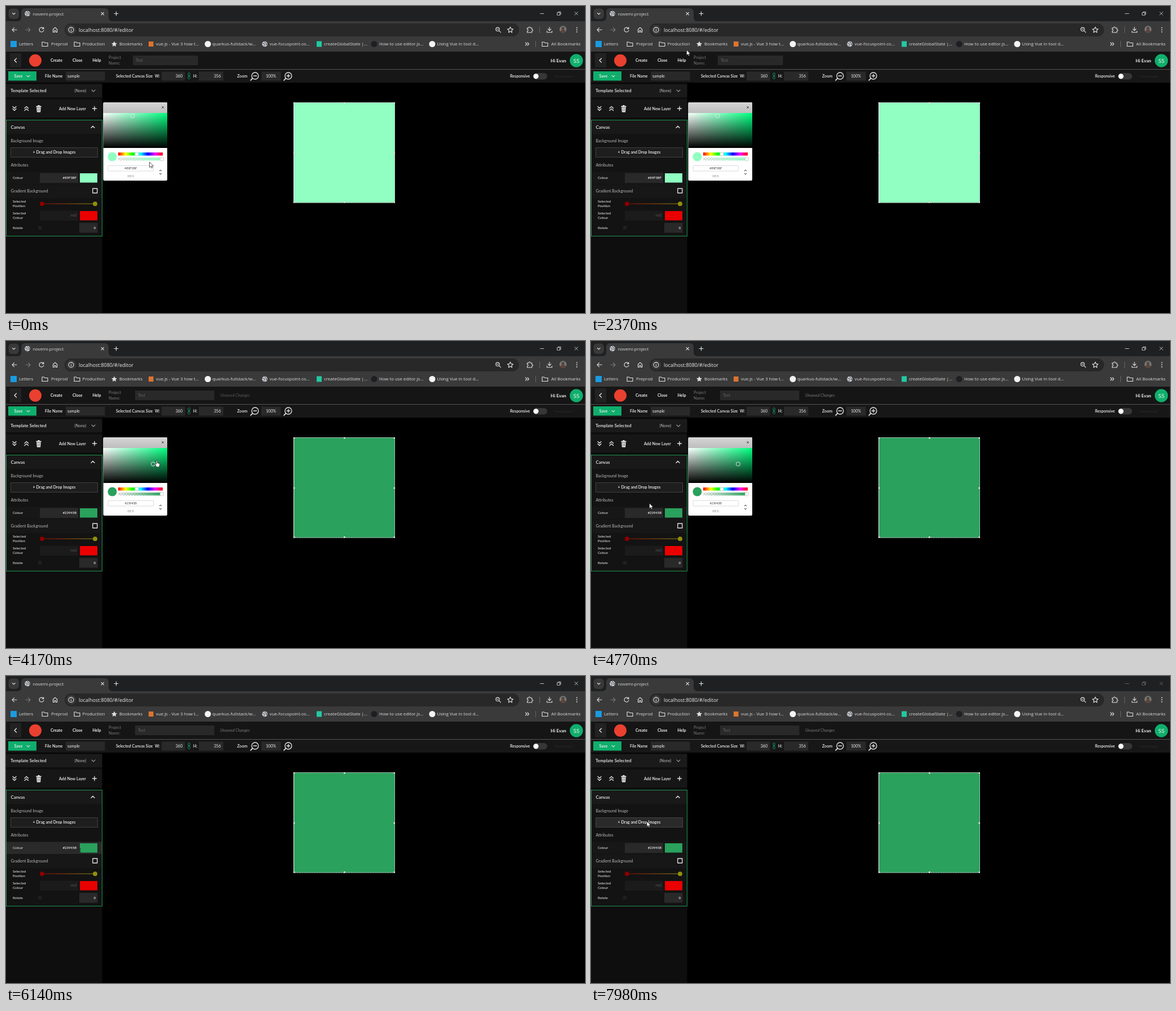
Animation, 1027 px wide and 545 px high, one loop 8 s. Source, as an HTML page:

```html
<!DOCTYPE html>
<html lang="en">
<head>
<meta charset="utf-8">
<title>Canvas editor</title>
<style>
html, body { margin: 0; width: 100%; height: 100%; overflow: hidden; background: #000; }
svg { display: block; width: 100%; height: 100%; }
text { font: 7.1px Lato, sans-serif; fill: #f2f2f2; white-space: pre; }
.ui text { font: 7.8px "Open Sans", sans-serif; fill: #dedede; }
.ui .url { font-size: 8.9px; fill: #eee; }
.bold text, text.bold { font-weight: 600; }
.menu text { font-weight: 700; }
.big { font-size: 7.9px; }
.small { font-size: 6.2px; }
.grey { fill: #b9b9b9; }
.dim { fill: #666; }
.faint { fill: #777; }
.end { text-anchor: end; }
.mid { text-anchor: middle; }
.line { fill: none; stroke: #e4e4e4; stroke-width: 1.1; stroke-linecap: round; stroke-linejoin: round; }
.thin { stroke-width: .8; }
.thick { stroke-width: 1.35; }
.field { fill: #292929; }
.picker text { font: 5.8px "Liberation Serif", serif; fill: #333; text-anchor: middle; }
</style>
</head>
<body>
<svg viewBox="0 0 1027 545" preserveAspectRatio="none">
  <defs>
    <linearGradient id="white"><stop stop-color="#fff"/><stop offset="1" stop-color="#fff" stop-opacity="0"/></linearGradient>
    <linearGradient id="black" x2="0" y2="1"><stop stop-opacity="0"/><stop offset="1"/></linearGradient>
    <linearGradient id="bar" x2="0" y2="1"><stop stop-color="#d6d6d6"/><stop offset="1" stop-color="#bdbdbd"/></linearGradient>
    <linearGradient id="hues">
      <stop stop-color="red"/><stop offset=".167" stop-color="#ff0"/><stop offset=".333" stop-color="#0f0"/>
      <stop offset=".5" stop-color="#0ff"/><stop offset=".667" stop-color="#00f"/><stop offset=".833" stop-color="#f0f"/><stop offset="1" stop-color="red"/>
    </linearGradient>
    <linearGradient id="alpha"><stop class="tintStop" stop-opacity="0"/><stop class="tintStop" offset="1"/></linearGradient>
    <linearGradient id="ramp"><stop stop-color="#a00000"/><stop offset="1" stop-color="#949410"/></linearGradient>
    <pattern id="checks" width="5" height="5" patternUnits="userSpaceOnUse"><path fill="#fff" d="M0 0h5v5H0z"/><path fill="#ccc" d="M0 0h2.5v2.5H0zM2.5 2.5H5V5H2.5z"/></pattern>
    <path id="folder" class="line" d="M-5-3.5h3.5l1.3 1.5H5v6H-5z"/>
    <path id="star" d="M0-5 1.5-1.7 5-1.3 2.4 1 3.1 4.6 0 2.8-3.1 4.6-2.4 1-5-1.3-1.5-1.7z"/>
    <g id="globe"><circle r="4.8" fill="#c9ccd0"/><path d="M-4-1.5 -1-.8 0 1-1.5 2-1 4M0-4.3.8-2 3-1.5 3.6 1.5 1.5 1" fill="none" stroke="#4a4c50"/></g>
    <g id="lens" class="line thick"><circle r="6" cy="-.8" cx=".8"/><path d="M-3.6 3.6-7 7" stroke-width="1.7"/><path d="M-2-.8h5.6"/></g>
  </defs>

  <!-- Browser -->
  <g class="ui">
    <path fill="#1f2021" d="M0 0h1027v28H0z"/>
    <path fill="#3a3a3b" d="M0 27h20q7 0 7-7v-9q0-7 7-7h141q7 0 7 7v9q0 7 7 7h838v54H0z"/>
    <rect x="4.500" y="4.500" width="18.500" height="18.500" rx="6" fill="#39393a"/>
    <path class="line" d="M11.500 12.500l2.300 2.300 2.300-2.300M169 11.300l4.500 4.500m0-4.500-4.500 4.500M192 13.500h7m-3.500-3.500v7"/>
    <use href="#globe" x="38" y="13.500"/>
    <text x="47.500" y="16.500">novemi-project</text>
    <path id="windowButtons" class="line thin" d="M947.500 13.500h6.500M978 11.800h4.500v4.500H978zM979.500 11.500v-1.200h4.500v4.500h-1.200M1008.800 10.500l5.500 5.500m0-5.500-5.500 5.500"/>

    <rect x="104" y="31" width="806" height="23" rx="11.500" fill="#282829"/>
    <path class="line" d="M19 42.300h-8m3.500-3.600L11 42.300l3.500 3.600M66.300 39.800a4 4 0 1 0 .6 3.300M66.800 37.800v2.700h-2.700M83.500 46.500v-5l3.600-3.300 3.600 3.300v5h-2.400v-3h-2.400v3z"/>
    <path class="line" stroke-opacity=".4" d="M35 42.300h8m-3.500-3.600 3.500 3.600-3.500 3.600"/>
    <circle cx="115.500" cy="42.300" r="8.500" fill="#39393a"/>
    <g class="line"><circle cx="115.500" cy="42.300" r="4.400"/><path d="M115.500 42v2.200M115.500 40v.1"/>
      <circle cx="872" cy="41.300" r="3.200"/><path d="M874.500 43.800l3 3M870.600 41.300h2.800"/>
      <use href="#star" x="894.500" y="42.300"/>
      <path d="M924.500 39h2.500q0-2 1.600-2t1.600 2h2.600v2.700q1.800 0 1.800 1.400t-1.800 1.400v2.500h-8.300v-2.500q1.700 0 1.700-1.500t-1.700-1.500z"/>
      <path d="M964 37.500v6m-2.800-2.700 2.800 2.800 2.800-2.800M959.500 44.500v2.300h9v-2.300"/></g>
    <path stroke="#666" d="M946.500 37v11M939.500 62v11"/>
    <circle cx="988" cy="41.500" r="6.200" fill="#737a7c"/>
    <path d="M983 45.300q1-2.800 3.600-2.800a2.800 3 0 1 1 2.800 0q2.600 0 3.600 2.800a6.200 6.200 0 0 1-10 0z" fill="#5f4338"/>
    <path d="M1012.500 38.500v.1m0 3.600v.1m0 3.600v.1" class="line" style="stroke-width:2"/>
    <text class="url" x="129" y="45.800">localhost:8080/#/editor</text>

    <rect x="8" y="62" width="11" height="11" fill="#1a9be0"/>
    <use href="#folder" x="69" y="67.500"/><use href="#folder" x="126" y="67.500"/><use href="#folder" x="956" y="67.500"/>
    <use href="#star" x="192" y="67.500" fill="#e0e0e0"/>
    <rect x="253" y="63" width="8.500" height="9" fill="#dd7430"/>
    <circle cx="358" cy="67.500" r="5.500" fill="#f4f4f4"/>
    <use href="#globe" x="459" y="67.500"/>
    <rect x="551" y="62.500" width="9" height="10" fill="#22c9a0"/>
    <circle cx="653" cy="67.500" r="5.500" fill="#1d1f22"/>
    <circle cx="756" cy="67.500" r="5.500" fill="#f4f4f4"/>
    <text x="23" y="70.200">Letters</text><text x="80" y="70.200">Preprod</text><text x="135.500" y="70.200">Production</text>
    <text x="201" y="70.200">Bookmarks</text><text x="266" y="70.200">vue.js - Vue 3 how t...</text>
    <text x="366" y="70.200">quarkus-fullstack/w...</text><text x="467.500" y="70.200">vue-focuspoint-co...</text>
    <text x="564" y="70.200">createGlobalState |...</text><text x="662" y="70.200">How to use editor.js...</text>
    <text x="764.500" y="70.200">Using Vue in tool d...</text><text x="967" y="70.200">All Bookmarks</text>
    <path class="line" d="M921.500 65l2.500 2.500-2.500 2.500m3.500-5 2.500 2.500-2.500 2.500"/>
  </g>

  <!-- App header -->
  <path fill="#151515" d="M0 81h1027v31H0z"/>
  <path fill="#222" d="M7 84h20v25H7z"/>
  <path fill="#555" d="M0 112h1027v1H0z"/>
  <path fill="#171717" d="M0 113h1027v23H0z"/>
  <path class="line thick" d="M18.500 93l-3.500 3.500 3.500 3.500"/>
  <circle cx="52" cy="96.700" r="11" fill="#ea4030"/>
  <g class="menu"><text x="79" y="99">Create</text><text x="118" y="99">Close</text><text x="153.500" y="99">Help</text>
    <text x="966" y="100" style="font-size:8.100px">Hi Evan</text></g>
  <text class="faint" x="182" y="93.500">Project</text><text class="faint" x="182" y="104">Name:</text>
  <rect id="projectField" y="88" height="17" class="field"/>
  <text id="projectText" class="dim" y="99.300">Test</text>
  <text id="unsaved" class="faint" x="380" y="99" style="font-style:italic">Unsaved Changes</text>
  <circle cx="1011.700" cy="97" r="11.700" fill="#0fae6c"/>
  <text class="mid" x="1011.700" y="100.500" style="font-size:10px">SS</text>

  <rect x="4" y="116" width="50" height="16.500" fill="#0fae6c"/>
  <path class="line" d="M37 123.300l2.500 2.500 2.500-2.500"/>
  <path class="field" d="M106 116.500h69.500v16H106zM276 116.500h41.500v16H276zM342 116.500h43.500v16H342zM453 116.500h34.500v16H453z"/>
  <g class="bold"><text x="14.500" y="127">Save</text><text x="69" y="127">File Name</text><text x="195" y="127">Selected Canvas Size</text>
    <text x="264" y="127">W:</text><text x="332" y="127">H:</text><text x="410" y="127">Zoom</text><text x="894" y="127">Responsive</text></g>
  <text x="109" y="127">sample</text><text class="end" x="313" y="127">360</text><text class="end" x="381" y="127">356</text>
  <text class="mid" x="470" y="127">100%</text>
  <g fill="none" stroke="#168f5d"><rect x="322.800" y="118.500" width="3.600" height="5" rx="1.800"/><rect x="322.800" y="124.500" width="3.600" height="5" rx="1.800"/><path d="M324.600 122v4"/></g>
  <use href="#lens" x="441" y="124.800"/><use href="#lens" x="500" y="124.800"/><path class="line thick" d="M500.800 121.200v5.600"/>
  <rect x="935" y="119" width="25" height="11.500" rx="5.700" fill="#363636"/><circle cx="940" cy="124.800" r="4.600" fill="#fff"/>
  <text class="small" x="973" y="126.500" style="fill:#2d2d2d">Fixed layout</text>

  <!-- Sidebar -->
  <path fill="#0e0e0e" d="M0 137h170.500v408H0z"/>
  <path fill="#1a1a1a" d="M0 139h170.500v23H0z"/>
  <path fill="#161616" d="M0 166h170.500v32H0z"/>
  <text class="bold big" x="8" y="153.200">Template Selected</text><text class="grey" x="121.500" y="153">(None)</text>
  <path class="line" style="stroke:#999" d="M152 149l3 3 3-3"/>
  <path class="line thick" d="M12 178.500l3 3 3-3m-6 4 3 3 3-3M33 181.500l3.300-3 3.300 3m-6.600 4 3.300-3 3.300 3M153.500 182h7m-3.500-3.500v7"/>
  <path fill="#eee" d="M53.500 177.500h9v2h-9zM56.500 176h3v2h-3zM54.300 180.200h7.400l-.6 8.300h-6.200z"/><path stroke="#222" stroke-width=".7" d="M56.700 181.500v5.500m2.600-5.500v5.500"/>
  <text class="bold" x="94" y="184.700">Add New Layer</text>

  <path fill="#131313" d="M0 203h170.500v206H0z"/>
  <path fill="#191919" d="M0 203h170.500v24H0z"/>
  <rect id="colourRow" y="294.500" width="170" height="21.500"/>
  <path fill="#171717" d="M0 317h170.500v24H0z"/>
  <rect x=".5" y="202.500" width="170" height="206" fill="none" stroke="#1c9350"/>
  <text class="bold big" x="8.500" y="218">Canvas</text><path class="line thick" d="M151 216.300l3-3 3 3"/>
  <text class="grey" x="8.500" y="241.500">Background Image</text>
  <rect id="dropZone" x="8.500" y="251.500" width="154" height="17" stroke="#555" stroke-dasharray="2 1"/>
  <text class="mid bold" x="85.500" y="262.300">+ Drag and Drop Images</text>
  <text class="grey" x="8.500" y="284.800">Attributes</text>
  <text class="small" x="12" y="307">Colour</text>
  <rect x="60" y="296.500" width="68" height="17.500" class="field"/>
  <text id="hexSide" class="end bold" x="125" y="307.300" style="font-size:5.900px"></text>
  <rect class="tint" x="131" y="297" width="31" height="16.500"/>
  <text class="grey" x="8.500" y="330.700">Gradient Background</text>
  <rect x="153.800" y="324" width="8" height="8" class="line thick"/>
  <text class="small" x="12" y="349">Selected</text><text class="small" x="12" y="356.500">Position</text>
  <rect x="64" y="350.600" width="94" height="1" fill="url(#ramp)"/>
  <circle cx="63.800" cy="351.200" r="3.900" fill="#8b0000"/><circle cx="158" cy="351.200" r="3.900" fill="#90900d"/>
  <text class="small" x="12" y="370">Selected</text><text class="small" x="12" y="377.500">Colour</text>
  <path fill="#1b1b1b" d="M60 363.500h68v17.500H60z"/><text class="end" x="125" y="374.300" style="fill:#555">red</text>
  <rect x="131" y="364" width="31" height="16.500" fill="#ea0000"/>
  <text class="small" x="12" y="395.500">Rotate</text><circle cx="60" cy="393.500" r="3.500" fill="#202020"/>
  <path class="field" d="M130 385h32.500v17.500H130z"/><text class="end bold small" x="159" y="396">0</text>

  <!-- Artboard -->
  <g>
    <rect class="tint" x="510" y="171" width="180" height="178.500"/>
    <g fill="none"><rect x="510.500" y="171.500" width="179" height="177.500" stroke="#222" stroke-opacity=".5"/>
      <rect x="510.500" y="171.500" width="179" height="177.500" stroke="#fff" stroke-opacity=".85" stroke-dasharray="2 1"/>
      <path stroke="#fff" d="M510.500 171v178.500"/></g>
    <path fill="#fff" stroke="#666" stroke-width=".3" d="M509.800 171h2.500v2.500h-2.500zM599 171h3v2.500h-3zM687.500 171h2.500v2.500h-2.500zM509.800 259.500h2.500v3h-2.500zM687.500 259.500h2.500v3h-2.500zM509.800 347h2.500v2.500h-2.500zM599 347h3v2.500h-3zM687.500 347h2.500v2.500h-2.500z"/>
  </g>

  <!-- Colour picker -->
  <g id="picker" class="picker">
    <rect x="172.500" y="171" width="113.500" height="139" rx="2" fill="#fff"/>
    <path fill="url(#bar)" d="M172.500 190v-17q0-2 2-2H284q2 0 2 2v17z"/>
    <path d="M276.500 178.300l3.200 3.200m0-3.200-3.200 3.200" stroke="#222" stroke-width=".9"/>
    <path fill="#00ff80" d="M172.500 190H286v62H172.500z"/><path fill="url(#white)" d="M172.500 190H286v62H172.500z"/><path fill="url(#black)" d="M172.500 190H286v62H172.500z"/>
    <circle id="handle" r="3.600" fill="none" stroke="#e8e8e8" stroke-width=".9"/>
    <circle class="tint" cx="188.500" cy="267.500" r="8"/>
    <path fill="url(#hues)" d="M199 260h79v5.500h-79z"/>
    <path fill="url(#checks)" d="M199 269h79v5.300h-79z"/><path fill="url(#alpha)" d="M199 269h79v5.300h-79z"/>
    <g fill="#f8f8f8" stroke="#aaa" stroke-width=".5"><circle cx="232" cy="262.800" r="3.500"/><circle cx="276.500" cy="271.700" r="3.500"/></g>
    <rect x="181" y="283.300" width="80.500" height="9.700" rx="1" fill="#fff" stroke="#ccc" stroke-width=".7"/>
    <text id="hexPicker" x="221.300" y="290.200"></text><text x="221.300" y="303.500" style="fill:#888">HEX</text>
    <path d="M272 293l2-2 2 2m-4 4 2 2 2-2" fill="none" stroke="#222"/>
  </g>

  <!-- Pointer -->
  <g id="pointer">
    <path id="arrow" d="M0 0v9.500l2.300-2.100 1.500 3.400 1.600-.7-1.500-3.200h3z" fill="#fff" stroke="#111" stroke-width=".7"/>
    <path id="hand" d="M2.300 6V1a1 1 0 0 1 2 0v3.500l3.600.9q1.100.3.9 1.500l-.6 3q-.4 1.800-1.700 1.800H4.300q-1 0-1.600-1L.3 7.300q0-1.300 2-.3z" fill="#fff" stroke="#111" stroke-width=".7"/>
    <path id="beam" d="M-1.500-2.500h3M0-2.500v6M-1.500 3.500h3" stroke="#142" fill="none" stroke-width=".8"/>
  </g>
</svg>
<script>
const LOOP = 8000, DRAG = 3450, CLOSE = 5350, BLUR = 7700;

// [time, x, y] of the pointer tip
const pointerPath = [
  [0, 254.5, 277], [150, 254.5, 277], [950, 70.5, 296], [1250, 70.5, 296], [2300, 169.5, 78], [2450, 169.5, 78],
  [3200, 224, 192], [DRAG, 224, 192], [3940, 244.5, 212], [4130, 264, 212], [4250, 264, 212],
  [4720, 103.5, 288], [4850, 103.5, 288], [5250, 108, 446], [5600, 108, 446],
  [6060, 131.5, 309], [6800, 131.5, 309], [7500, 99, 258], [LOOP, 99, 258]
];
// [time, red, green] of the chosen colour; its hue is fixed at 150 degrees
const colourPath = [[0, 137, 245], [DRAG, 137, 245], [3920, 62, 150], [3960, 62, 150], [4130, 35, 148], [LOOP, 35, 148]];

const el = id => document.getElementById(id);
const all = selector => document.querySelectorAll(selector);
const clamp = v => Math.min(1, Math.max(0, v));
const show = (id, on) => el(id).setAttribute("visibility", on ? "visible" : "hidden");
const set = (id, attrs) => { for (const key in attrs) el(id).setAttribute(key, attrs[key]); };
const within = (x, y, left, top, right, bottom) => x >= left && x <= right && y >= top && y <= bottom;

function sample(path, t) {
  const i = Math.max(1, path.findIndex(p => p[0] >= t));
  const [a, b] = [path[i - 1], path[i]];
  const u = clamp((t - a[0]) / (b[0] - a[0])), e = u * u * (3 - 2 * u);
  return [1, 2].map(k => a[k] + (b[k] - a[k]) * e);
}

function drawColour(t) {
  const [r, g] = sample(colourPath, t).map(Math.round);
  const b = Math.floor((r + g) / 2);
  const hex = "#" + [r, g, b].map(c => c.toString(16).padStart(2, "0")).join("").toUpperCase();
  const tint = `rgb(${r + 7},${Math.min(255, g + 13)},${b + 2})`;
  all(".tint").forEach(n => n.setAttribute("fill", tint));
  all(".tintStop").forEach(n => n.setAttribute("stop-color", tint));
  el("hexSide").textContent = el("hexPicker").textContent = hex;
  set("handle", { cx: 174.7 + 113 * (1 - r / g), cy: 192.4 + 62 * (1 - g / 255) });
}

function drawPointer(t) {
  const [x, y] = sample(pointerPath, t), open = t < CLOSE;
  const hand = open && within(x, y, 173, 190, 286, 252);
  const beam = !open && within(x, y, 60, 296, 163, 314);
  set("pointer", { transform: `translate(${x} ${y})` });
  show("arrow", !hand && !beam);
  show("hand", hand);
  show("beam", beam);
  show("picker", open);
  const overRow = !open && within(x, y, 0, 294.5, 170, 316);
  const overDrop = !open && within(x, y, 8, 251, 163, 269);
  set("colourRow", { fill: overRow ? "#2a2a2a" : "#171717" });
  set("dropZone", { fill: overDrop ? "#2a2a2a" : "#1e1e1e" });
}

function draw(t) {
  const edited = t > DRAG + 50;
  set("projectField", { x: edited ? 229 : 225, width: edited ? 140.5 : 115.5 });
  set("projectText", { x: edited ? 234 : 230 });
  set("unsaved", { opacity: clamp((t - 3900) / 400) });
  set("windowButtons", { opacity: t < BLUR ? 1 : 0.4 });
  drawColour(t);
  drawPointer(t);
}

const start = performance.now();
function tick() {
  draw((performance.now() - start) % LOOP);
  requestAnimationFrame(tick);
}
tick();
</script>
</body>
</html>
```
